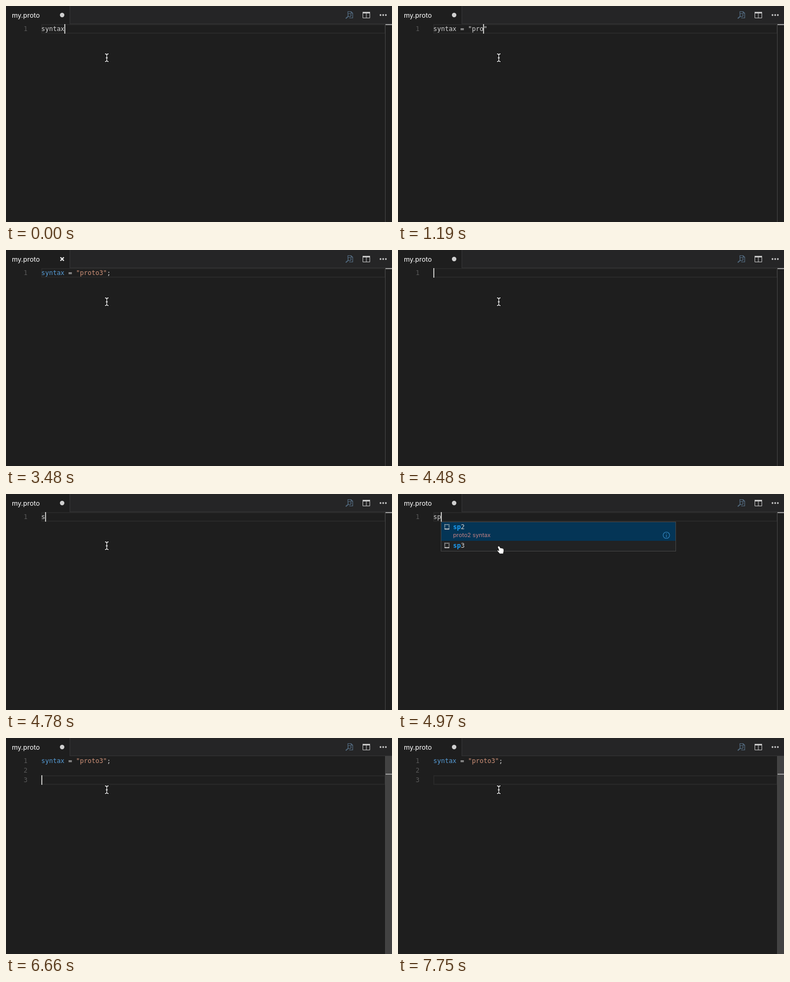
An HTML page for the animation above (8 s loop, 722 px wide and 406 px high).

```html
<!DOCTYPE html>
<html lang="en">
<head>
<meta charset="utf-8">
<title>Editor</title>
<style>
html, body { margin: 0; width: 100%; height: 100%; overflow: hidden; background: #1e1e1e; }
svg { display: block; width: 722px; height: 406px; }
text { white-space: pre; }
.mono { font: 12px "DejaVu Sans Mono", monospace; fill: #d4d4d4; }
.num { fill: #5a5a5a; }
.ui { font-family: Inter, sans-serif; }
</style>
</head>
<body>
<svg id="stage" viewBox="0 0 722 406">
  <rect width="722" height="406" fill="#1e1e1e"/>
  <rect x="120" width="602" height="34" fill="#252526"/>
  <rect x="119" width="1" height="34" fill="#363637"/>
  <rect x="119" y="33" width="603" height="1" fill="#343435"/>
  <text class="ui" x="11" y="22" font-size="12.6" fill="#fff">my.proto</text>
  <circle id="dirty" cx="105" cy="17" r="4.2" fill="#cfcfcf"/>
  <path id="close" d="M101.8 13.8l6.4 6.4m0-6.4l-6.4 6.4" stroke="#f0f0f0" stroke-width="2.1"/>

  <g fill="none" stroke="#536b80" stroke-width="1.2">
    <path d="M639.5 15V10.5H645.5L648.5 13.5V22.5H642M645.5 10.5V13.5H648.5"/>
    <circle cx="642.5" cy="17" r="3"/>
    <path d="M640.2 19.4L635.5 23.5" stroke-width="1.8"/>
  </g>
  <path d="M667.5 12V22.5H680.5V12M674 12V22.5" fill="none" stroke="#c5c5c5"/>
  <rect x="667" y="11" width="14" height="3" fill="#c5c5c5"/>
  <g fill="#c5c5c5">
    <circle cx="700.5" cy="17" r="1.7"/><circle cx="705.5" cy="17" r="1.7"/><circle cx="710.5" cy="17" r="1.7"/>
  </g>

  <rect id="line" x="67" width="642" height="16" fill="none" stroke="#282828" stroke-width="2"/>
  <rect id="sel" x="66" y="34" width="130" height="18" fill="#264f78"/>
  <g id="nums"></g>
  <text id="code" class="mono" x="66" y="47"></text>
  <rect id="slider" x="710" y="34" width="12" height="372" fill="#424242"/>
  <rect x="709" y="34" width="1" height="372" fill="#464646"/>
  <rect id="mark" x="710" width="12" height="2" fill="#9c9c9c"/>
  <rect id="caret" width="2" height="18" fill="#c0c0be"/>
  <g id="popup"></g>

  <g id="beam" fill="none" stroke-linecap="round">
    <path id="bar" d="M185.5 90Q188.5 90 188.5 92.5Q188.5 90 191.5 90M188.5 92V102M185.5 104.5Q188.5 104.5 188.5 102Q188.5 104.5 191.5 104.5M187 97.5H190" stroke="#000" stroke-width="2.6"/>
    <use href="#bar" style="stroke:#fff"/>
    <path d="M185.5 90Q188.5 90 188.5 92.5Q188.5 90 191.5 90M188.5 92V102M185.5 104.5Q188.5 104.5 188.5 102Q188.5 104.5 191.5 104.5M187 97.5H190" stroke="#f4f4f4" stroke-width="1.3"/>
  </g>
  <path id="hand" d="M187 98.6Q188.6 97 190 98.8L191.6 101.6Q193 100.6 194 102Q195.4 101.2 196 102.6Q197.6 102.2 197.9 104L198 107.5L196.8 112.4H190.4L186 107.4Q185 105.6 186.6 105.4L189 106.4L186.6 100.4Q186.3 99.3 187 98.6Z" fill="#fff" stroke="#000" stroke-width=".8"/>
</svg>
<script>
const LOOP = 8000, CHAR = 7.224, TOP = 34, ROW = 18;
const $ = id => document.getElementById(id);
const FULL = 'syntax = "proto3";';

const start = {
  text: 'syntax', pos: 6, row: 0, on: true, dirty: true, color: false,
  sel: false, slider: false, popup: null
};
const type = (text, pos = text.length) => ({ text, pos, on: true });
const off = { on: false }, on = { on: true };
const items = ['sp2', 'sp3', 'service', 'svc', 'syntax'];

// [time, changes to the editor state]
const steps = [
  [200, type('syntax ')],
  [300, type('syntax =')],
  [500, type('syntax = ')],
  [800, type('syntax = ""', 10)],
  ...[...'proto'].map((_, i) =>
    [[1000, 1100, 1190, 1290, 1390][i], type(`syntax = "${'proto'.slice(0, i + 1)}"`, 11 + i)]),
  [1690, off],
  [2090, type('syntax = "proto3"', 16)],
  [2190, type('syntax = "proto3"')],
  [2490, { ...type(FULL), color: true }],
  [2890, off],
  [3180, { on: true, dirty: false }],
  [3480, off],
  [3680, { on: true, sel: true }],
  [3980, off], [4280, on],
  [4480, { ...type(''), dirty: true, sel: false, color: false }],
  [4780, type('s')],
  [4880, { popup: { x: 73, list: items, pick: 0, match: 1 } }],
  [4970, { ...type('sp'), popup: { x: 80, list: items.slice(0, 2), pick: 0, match: 2 } }],
  [5270, { on: false, popup: { x: 80, list: items.slice(0, 2), pick: 1, match: 2 } }],
  [5570, { ...type(FULL), color: true, popup: null }],
  [5870, off], [6170, on],
  [6570, { row: 1, pos: 0, on: true, slider: true }],
  [6660, { row: 2 }],
  [7060, off], [7360, on], [7750, off]
];

function stateAt(t) {
  return Object.assign({}, start, ...steps.filter(s => s[0] <= t).map(s => s[1]));
}

const show = (id, yes) => $(id).setAttribute('visibility', yes ? 'visible' : 'hidden');
const span = (color, s) => `<tspan fill="${color}">${s}</tspan>`;

function codeMarkup(s) {
  if (!s.color) return s.text;
  return span('#569cd6', 'syntax') + ' = ' + span('#ce9178', '"proto3"') + ';';
}

function popupMarkup(p) {
  if (!p) return '';
  const height = 20 + 18 * 2 + (p.list.length - 2) * 19;
  let y = 53;
  let out = `<rect x="${p.x + .5}" y="52.5" width="439" height="${height - 1}" fill="#212223" stroke="#454545"/>`;
  p.list.forEach((name, i) => {
    const picked = i === p.pick;
    if (picked) {
      out += `<rect x="${p.x + 1}" y="${y}" width="438" height="35" fill="#043556"/>
        <text class="ui" x="${p.x + 23}" y="${y + 28}" font-size="10.8" fill="#c48284">${name.replace('sp', 'proto')} syntax</text>
        <g fill="none" stroke="#2f80b8" stroke-width="1.2"><circle cx="${p.x + 422}" cy="${y + 24.5}" r="6"/>
        <path d="M${p.x + 422} ${y + 20.5}v1.6m0 1.4v5"/></g>`;
    }
    out += `<rect x="${p.x + 7.5}" y="${y + 4.5}" width="8" height="8" fill="none" stroke="#d0d0d0" stroke-width="1.3" stroke-dasharray="1.6 .8"/>
      <path d="M${p.x + 7} ${y + 13}h9" stroke="#d0d0d0" stroke-width="1.4"/>
      <text class="mono" x="${p.x + 23}" y="${y + 13}"><tspan fill="#1b9cf2" font-weight="bold">${name.slice(0, p.match)}</tspan>${name.slice(p.match)}</text>`;
    y += picked ? 35 : 19;
  });
  return out;
}

let last = '';
function draw(t) {
  const s = stateAt(t), key = JSON.stringify(s);
  if (key === last) return;
  last = key;
  const y = TOP + s.row * ROW;
  $('code').innerHTML = codeMarkup(s);
  $('popup').innerHTML = popupMarkup(s.popup);
  $('nums').innerHTML = Array.from({ length: s.row + 1 }, (_, i) =>
    `<text class="mono num" x="33" y="${47 + i * ROW}">${i + 1}</text>`).join('');
  $('line').setAttribute('y', y + 1);
  $('mark').setAttribute('y', TOP + Math.round(s.row * 16.7));
  $('caret').setAttribute('x', Math.floor(66 + s.pos * CHAR));
  $('caret').setAttribute('y', y);
  show('caret', s.on);
  show('dirty', s.dirty);
  show('close', !s.dirty);
  show('sel', s.sel);
  show('slider', s.slider);
  show('beam', !s.popup);
  show('hand', s.popup);
}

const begin = performance.now();
function frame() {
  draw((performance.now() - begin) % LOOP);
  requestAnimationFrame(frame);
}
frame();
</script>
</body>
</html>
```
